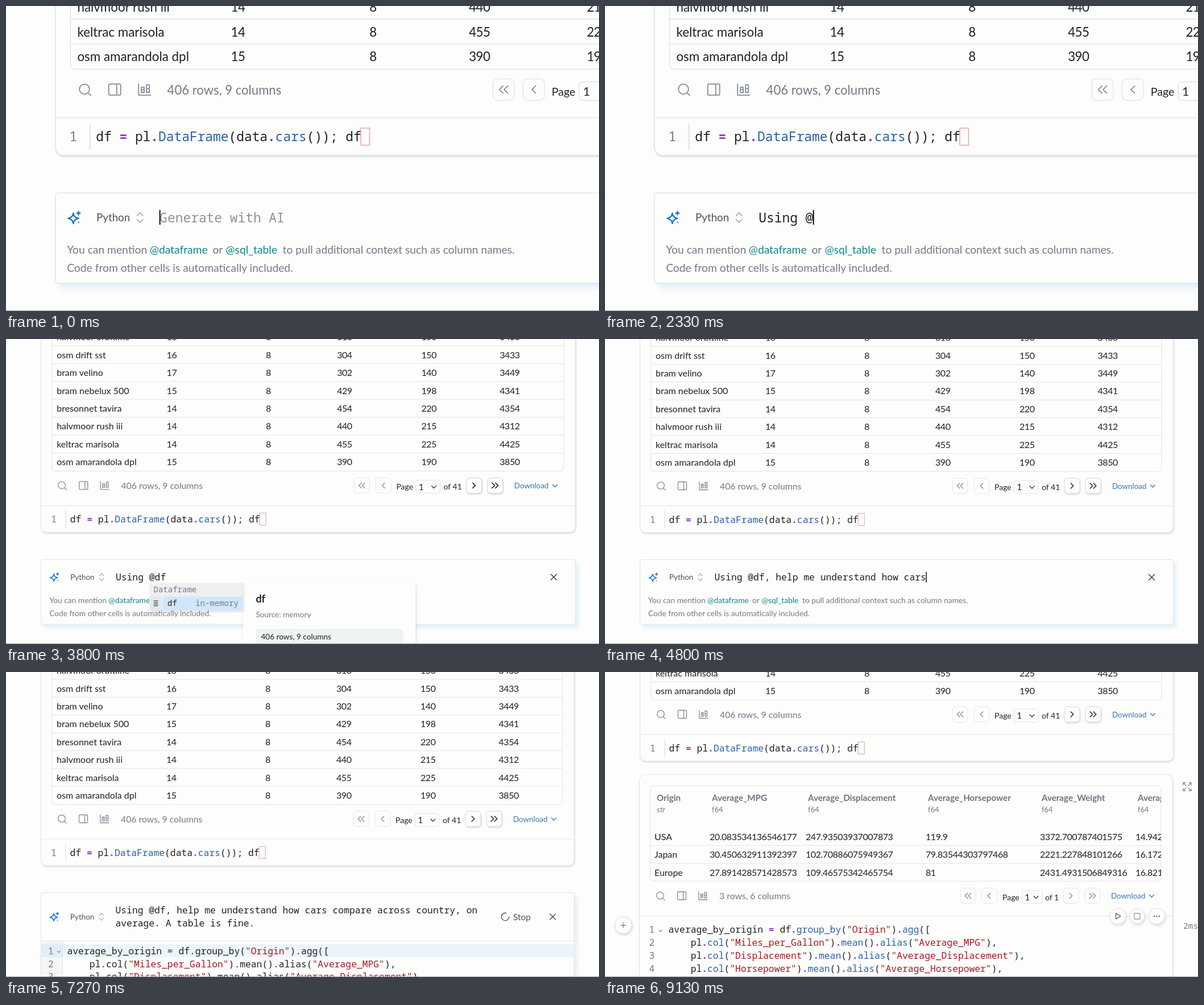
An HTML page that plays this animation: 1043x537 px, repeating every 9190 ms.

```html
<!DOCTYPE html>
<html lang="en">
<head>
<meta charset="utf-8">
<title>Notebook AI cell</title>
<style>
  html, body { margin: 0; width: 100%; height: 100%; overflow: hidden; background: #fcfdfc; }
  svg { display: block; width: 100vw; height: 100vh; }
  text { font-family: Lato, sans-serif; fill: #202126; }
  .mono { font-family: "Noto Sans Mono", monospace; }
  .num { letter-spacing: -.45px; }
  .bold { font-weight: 700; }
  .end { text-anchor: end; }
  .grey { fill: #727a86; }
  .hint { fill: #929297; }
  .soft { fill: #505358; }
  .head { fill: #6d7580; font-weight: 700; }
  .link { fill: #0f848c; }
  .blue { fill: #3a76b4; }
  .fn { fill: #2a60a8; }
  .op { fill: #9a2fd6; font-weight: 600; }
  .str { fill: #a31a1f; }
  .card { fill: #fdfdfc; stroke: #dfe2ea; }
  .cell { filter: drop-shadow(1px 2px 1px rgba(60, 70, 100, .16)); }
  .ask { filter: drop-shadow(5px 6px 2.5px #e4f1fa); }
  .float { filter: drop-shadow(1px 2px 2px rgba(0, 0, 0, .15)); }
  .rule { stroke: #e2e4ec; fill: none; }
  .icon { fill: none; stroke: #858c97; stroke-width: 1.3; stroke-linecap: round; stroke-linejoin: round; }
</style>
</head>
<body>
<svg viewBox="0 0 1043 537" id="stage"></svg>
<script>
const LOOP = 9190, H = 537, SUBMIT = 6500, STREAM = 6800, RESULT = 8000;
const PROMPT = 'Using @df, help me understand how cars compare across country, on average. A table is fine.';
const TYPING = [[1400, 0], [2280, 7], [2780, 7], [2790, 8], [3300, 8], [3310, 9],
                [3900, 9], [5920, 76], [6400, 91]];
const CODE = [
  'average_by_origin = df.group_by("Origin").agg([',
  '    pl.col("Miles_per_Gallon").mean().alias("Average_MPG"),',
  '    pl.col("Displacement").mean().alias("Average_Displacement"),',
  '    pl.col("Horsepower").mean().alias("Average_Horsepower"),',
  '    pl.col("Weight_in_lbs").mean().alias("Average_Weight"),'
];
const CARS = [
  ['osm amarandola dpl', 15, 8, 390, 190, 3850],
  ['keltrac marisola', 14, 8, 455, 225, 4425],
  ['halvmoor rush iii', 14, 8, 440, 215, 4312],
  ['bresonnet tavira', 14, 8, 454, 220, 4354],
  ['bram nebelux 500', 15, 8, 429, 198, 4341],
  ['bram velino', 17, 8, 302, 140, 3449],
  ['osm drift sst', 16, 8, 304, 150, 3433],
  ['halvmoor orbitline', 18, 8, 318, 150, 3436]
];
const MEANS = [
  ['USA', '20.083534136546177', '247.93503937007873', '119.9', '3372.700787401575', '14.942519685'],
  ['Japan', '30.450632911392397', '102.70886075949367', '79.83544303797468', '2221.227848101266', '16.172151898'],
  ['Europe', '27.891428571428573', '109.46575342465754', '81', '2431.4931506849316', '16.821917808']
];
const HEADS = ['Origin', 'Average_MPG', 'Average_Displacement', 'Average_Horsepower',
               'Average_Weight', 'Average_Acceleration'];
const MONO = 16.33, CHAR = MONO * .6;

// y is the middle of the capitals
const text = (x, y, s, cls = '', size = 16) =>
  `<text x="${x}" y="${y + size * .36}" class="${cls}" font-size="${size}">${s}</text>`;
const pre = s => s.replace(/ /g, '\u00a0');
const mono = (x, y, s, cls = '', size = MONO) => text(x, y, pre(s), 'mono ' + cls, size);
const rect = (x, y, w, h, r, attr) => `<rect x="${x}" y="${y}" width="${w}" height="${h}" rx="${r}" ${attr}/>`;
const line = (x1, y1, x2, y2) => `<path class="rule" d="M${x1} ${y1}L${x2} ${y2}"/>`;
const icon = (x, y, d, style = '') =>
  `<path class="icon" transform="translate(${x} ${y})" d="${d}" style="${style}"/>`;
const group = (id, body, attr = '') => `<g id="${id}" ${attr}>${body}</g>`;

function paint(src, full) {
  const parts = src.match(/"[^"]*"?|[A-Za-z_]+\(?|[^"A-Za-z_]/g) || [];
  return parts.map(p => {
    const span = (c, s) => `<tspan class="${c}">${s}</tspan>`;
    if (p[0] === '"') return span('str', p);
    if (full && (p === '.' || p === '=')) return span('op', p);
    if (full && p.length > 1 && p.endsWith('(')) return span('fn', p.slice(0, -1)) + '(';
    return p === ' ' ? '\u00a0' : p;
  }).join('');
}
const code = (x, y, s, full) => text(x, y, paint(s, full), 'mono', MONO);

const CHEV = { left: 'M2.3-4.5L-2.3 0L2.3 4.5', right: 'M-2.3-4.5L2.3 0L-2.3 4.5', down: 'M-4-2L0 2L4-2' };

function pageButton(x, y, dir, double, on) {
  const style = on ? 'stroke:#25272c;stroke-width:1.6' : '';
  const arrows = (double ? [-3, 3] : [0]).map(d => icon(x + d, y, CHEV[dir], style)).join('');
  const edge = `fill="#fdfdfd" stroke="${on ? '#d3d6dd' : '#e3e5ea'}" class="${on ? 'cell' : ''}"`;
  return rect(x - 13.5, y - 13.5, 27, 27, 6, edge) + arrows;
}

function footer(y, dx, info, total, xs, on) {
  const [first, prev, page, sel, selW, of, next, last, load] = xs;
  return icon(98 + dx, y - .5, 'M6.3 0A6.3 6.3 0 1 1-6.3 0A6.3 6.3 0 1 1 6.3 0M4.6 4.6L8 8')
    + icon(136 + dx, y, 'M-6-7H6Q7.5-7 7.5-5.5V5.5Q7.5 7 6 7H-6Q-7.5 7-7.5 5.5V-5.5Q-7.5-7-6-7M2.5-7V7')
    + icon(173 + dx, y, 'M-7-7V7H8M-3.5-3H0V3.5H-3.5ZM3-6H6.5V3.5H3ZM-3.5 0H0M3-1H6.5')
    + text(202 + dx, y + .5, info, 'grey', 15.8)
    + pageButton(first, y, 'left', true) + pageButton(prev, y, 'left')
    + text(page, y + 2.5, 'Page', '', 14)
    + rect(sel, y - 9.5, selW, 23, 4, 'fill="#fdfdfd" stroke="#e0e2e8"')
    + text(sel + 5, y + 2.5, '1', '', 15) + icon(sel + selW - 11, y + 2.5, CHEV.down, 'stroke:#333')
    + text(of, y + 2.5, 'of ' + total, '', 14)
    + pageButton(next, y, 'right', false, on) + pageButton(last, y, 'right', true, on)
    + text(load, y + .5, 'Download', 'blue', 13.4) + icon(load + 71.5, y + .5, CHEV.down, 'stroke:#3a76b4');
}

function carsCell() {
  const cols = [89, 282, 456, 581, 729, 866.5];
  let out = rect(61.5, -200, 938, 541, 10, 'class="card cell"') + rect(80.5, -200, 898.5, 433, 6, 'class="card"');
  CARS.forEach((row, i) => {
    const y = 217.3 - 31.4 * i;
    row.forEach((v, j) => out += text(cols[j], y, v, j ? 'num' : ''));
    if (i) out += line(81, y + 15.5, 979, y + 15.5);
  });
  return out
    + footer(258.5, 0, '406 rows, 9 columns', 41, [624.5, 662.5, 685, 719.5, 42.5, 768, 821.5, 858.5, 892], true)
    + line(62, 294, 999, 294) + mono(79, 317.7, '1', 'grey')
    + '<path d="M105 302V334" stroke="#d8dae0"/>'
    + code(112.5, 317.7, 'df = pl.DataFrame(data.cars()); df', true)
    + rect(445.2, 307, 11, 21.5, 0, 'fill="none" stroke="#e3a0a4"');
}

function popup(right, rows) {
  let out = rect(right, 430, 303, 220, 4, 'class="float" fill="#fdfdfd"')
    + rect(252, 430, right - 252, rows.length * 23.8, 2, 'class="float" fill="#fdfdfd"');
  rows.forEach(([name, kind], i) => {
    const top = 430 + 23.8 * i, y = top + 11.6;
    if (!kind) {
      out += rect(252, top, right - 252, 23.8, 0, 'fill="#eeefef"') + mono(259, y, name, 'grey', 14);
      return;
    }
    const df = name === 'df';
    out += rect(252, top, 23, 23.8, 0, `fill="${df ? '#e4e9ee' : '#e4f1fc'}"`)
      + (df ? rect(275, top, right - 275, 23.8, 0, 'fill="#d0e7fb"')
            + icon(263, y, 'M-3.5-4.5H3.5M-3.5-1.5H3.5M-3.5 1.5H3.5M-3.5 4.5H3.5', 'stroke:#666')
          : `<text x="259" y="${y + 5}" font-size="15" font-style="italic" style="font-family:'Noto Serif',serif;fill:#2d7fc4">υ</text>`)
      + mono(283.5, y, name, '', 14) + mono(right - 8, y, kind, 'grey end', 14);
  });
  const x = right + 22.5;
  return out + text(x, 458, 'df', 'bold', 18) + text(x, 485.5, 'Source: memory', 'grey', 13.6)
    + rect(x, 510.5, 258.5, 40, 4, 'fill="#edf2f3"') + text(x + 9, 524, '406 rows, 9 columns', '', 13.6);
}

function askCell() {
  const sparkle = 'M-1-5.5Q-.3-.1 5.5 1Q-.3 2.1-1 7.5Q-1.7 2.1-7.5 1Q-1.7-.1-1-5.5ZM5.5-7.5V-3.5M3.5-5.5H7.5M5.7 6V6.2';
  const small = (x, y, s, cls = 'grey') => text(x, y, s, cls, 13.75);
  const help = small(76, 460, 'You can mention') + small(180, 460, '@dataframe', 'link')
    + small(259, 460, 'or') + small(275.5, 460, '@sql_table', 'link')
    + small(347, 460, 'to pull additional context such as column names.')
    + small(76, 483, 'Code from other cells is automatically included.');
  return rect(61.5, 388.5, 938, 114, 4, 'id="box" class="card ask"')
    + group('bar', icon(85, 419.5, sparkle, 'stroke:#1b74cb;stroke-width:1.7')
      + text(113, 419.5, 'Python', 'soft', 13.4)
      + icon(167.8, 419.5, 'M-3.6-2.5L0-6.2L3.6-2.5M-3.6 2.5L0 6.2L3.6 2.5', 'stroke:#b0b0b2')
      + icon(961.5, 419.5, 'M-5-5L5 5M5-5L-5 5', 'stroke:#333'))
    + group('help', help)
    + group('busy', '<path id="spin" class="icon" style="stroke:#555" d="M6.7 0A6.7 6.7 0 1 1 2.1-6.4"/>'
      + text(892, 431, 'Stop', 'soft', 15.5)
      + line(62, 473.5, 999, 473.5) + rect(62, 474, 37, 200, 0, 'fill="#f5f6f6"')
      + rect(62, 479.5, 37, 22.5, 0, 'fill="#e1eef8"') + rect(99.5, 479.5, 900, 22.5, 0, 'fill="#ecf4fc"')
      + line(99.5, 474, 99.5, 640) + icon(93, 493, 'M-2.5-1.5L0 1L2.5-1.5'))
    + group('stream', '') + group('prompt', '')
    + rect(0, 0, 1.5, 18.5, 0, 'id="caret" fill="#111"')
    + group('popAll', popup(440, [['Dataframe'], ['df', 'in-memory'], ['Variable'], ['data', 'DataLoader']]))
    + group('popDf', popup(416, [['Dataframe'], ['df', 'in-memory']]));
}

function resultCell() {
  const heads = [91, 188, 357, 568, 768, 937], cols = [87, 184, 353, 564, 765, 933];
  const round = (x, r, d, style) =>
    `<circle class="float" cx="${x}" cy="430" r="${r}" fill="#fdfdfd" stroke="#dfe2e8"/>` + icon(x, 430, d, style);
  let table = HEADS.map((h, i) => text(heads[i], 222, h, 'head', 15.2)
    + text(heads[i], 242.5, i ? 'f64' : 'str', 'grey', 13)).join('');
  MEANS.forEach((row, i) => {
    const y = 290 + 31.4 * i;
    row.forEach((v, j) => table += text(cols[j], y, v, j ? 'num' : ''));
    if (i) table += line(80, y - 15.7, 978, y - 15.7);
  });
  return rect(60.5, 180.5, 938, 500, 10, 'class="card cell"') + rect(79.5, 200, 898.5, 168, 6, 'class="card"')
    + `<clipPath id="edge"><rect x="80" y="200" width="898" height="168"/></clipPath><g clip-path="url(#edge)">${table}</g>`
    + footer(394, -1, '3 rows, 6 columns', 1, [638.5, 675.5, 699, 733.5, 35.5, 774, 819.5, 857.5, 890], false)
    + line(61, 430, 998, 430)
    + round(902, 14, 'M-3.5-5L5 0L-3.5 5Z', 'stroke:#555') + round(936, 13, 'M-5-5H5V5H-5Z', 'stroke:#9a9da3')
    + round(970.5, 14, 'M-4.5 0h.2M-.1 0h.2M4.3 0h.2', 'stroke:#444;stroke-width:2.2')
    + '<circle class="float" cx="32" cy="446" r="15" fill="#fdfdfd" stroke="#d6d9e0"/>'
    + icon(32, 446, 'M-4.5 0H4.5M0-4.5V4.5')
    + icon(1024, 202, 'M2-2L7-7M3-7H7V-3M-2-2L-7-7M-3-7H-7V-3M2 2L7 7M3 7H7V3M-2 2L-7 7M-3 7H-7V3')
    + mono(1017, 446.5, '2ms', 'grey', 14.5) + icon(97.5, 456, 'M-2.5-1.5L0 1L2.5-1.5')
    + CODE.map((s, i) => mono(77.5, 453.5 + 22.8 * i, String(i + 1), 'grey') + code(111.5, 453.5 + 22.8 * i, s, true)).join('');
}

const stage = document.getElementById('stage');
stage.innerHTML = group('camera', group('page',
    group('cars', carsCell()) + group('ask', askCell()) + group('result', resultCell(), 'transform="translate(0 184)"')))
  + '<path d="M0 536.5H1043" stroke="#a2a2a8"/>';

const el = {};
stage.querySelectorAll('[id]').forEach(n => el[n.id] = n);
const show = (id, on) => el[id].setAttribute('display', on ? 'inline' : 'none');
const move = (id, x, y, more = '') => el[id].setAttribute('transform', `translate(${x} ${y}) ${more}`);

function typed(t) {
  for (let i = 1; i < TYPING.length; i++) {
    const [t0, n0] = TYPING[i - 1], [t1, n1] = TYPING[i];
    if (t < t1) return Math.floor(n0 + (n1 - n0) * Math.max(0, (t - t0) / (t1 - t0)));
  }
  return PROMPT.length;
}

function wrap(s, cols) {
  if (s.length <= cols) return [s];
  const cut = s.lastIndexOf(' ', cols);
  return [s.slice(0, cut), s.slice(cut + 1)];
}

// critically damped zoom out, pinned near the lower left corner
function zoom(t) {
  const p = Math.max(0, t - 2430) * .0054;
  return 1 + .4 * (1 + p) * Math.exp(-p);
}

function streamed(t) {
  let left = Math.max(0, Math.floor((t - STREAM) * .37));
  return CODE.map((s, i) => {
    const part = s.slice(0, left), y = 491 + 22.8 * i;
    const open = i === 0 || left > 0;
    left = Math.max(0, left - s.length);
    return open ? mono(74, y, String(i + 1), 'grey') + code(107.5, y, part, false) : '';
  }).join('');
}

function render(t) {
  const busy = t >= SUBMIT, done = t >= RESULT;
  move('camera', -2, H, `scale(${zoom(t)}) translate(2 ${-H})`);
  const s = Math.min(1, Math.max(0, (t - 8050) / 650));
  move('page', 0, -184 * s * s * (3 - 2 * s));
  show('ask', !done);
  show('result', done);
  if (done) return;

  const n = typed(t), rows = wrap(PROMPT.slice(0, n), busy ? 70 : 75);
  const extra = rows.length > 1 ? 22.8 : 0;
  el.prompt.innerHTML = n
    ? rows.map((r, i) => mono(192.5, 419.5 + 22.8 * i, r)).join('')
    : mono(192.5, 419.5, 'Generate with AI', 'hint');
  move('caret', 192 + CHAR * rows[rows.length - 1].length, 410 + extra);
  show('caret', t < 3450 || (t >= 3900 && t < SUBMIT));
  move('bar', 0, extra / 2);
  move('help', 0, extra);
  el.box.setAttribute('height', busy ? 260 : 113.7 + extra);
  show('help', !busy);
  show('busy', busy);
  move('spin', 878, 431, `rotate(${(t - 7270) * .36})`);
  el.stream.innerHTML = busy ? streamed(t) : '';
  show('popAll', t >= 2420 && t < 3310);
  show('popDf', t >= 3310 && t < 3880);
}

const start = performance.now();
function tick() {
  render((performance.now() - start) % LOOP);
  requestAnimationFrame(tick);
}
tick();
</script>
</body>
</html>
```
